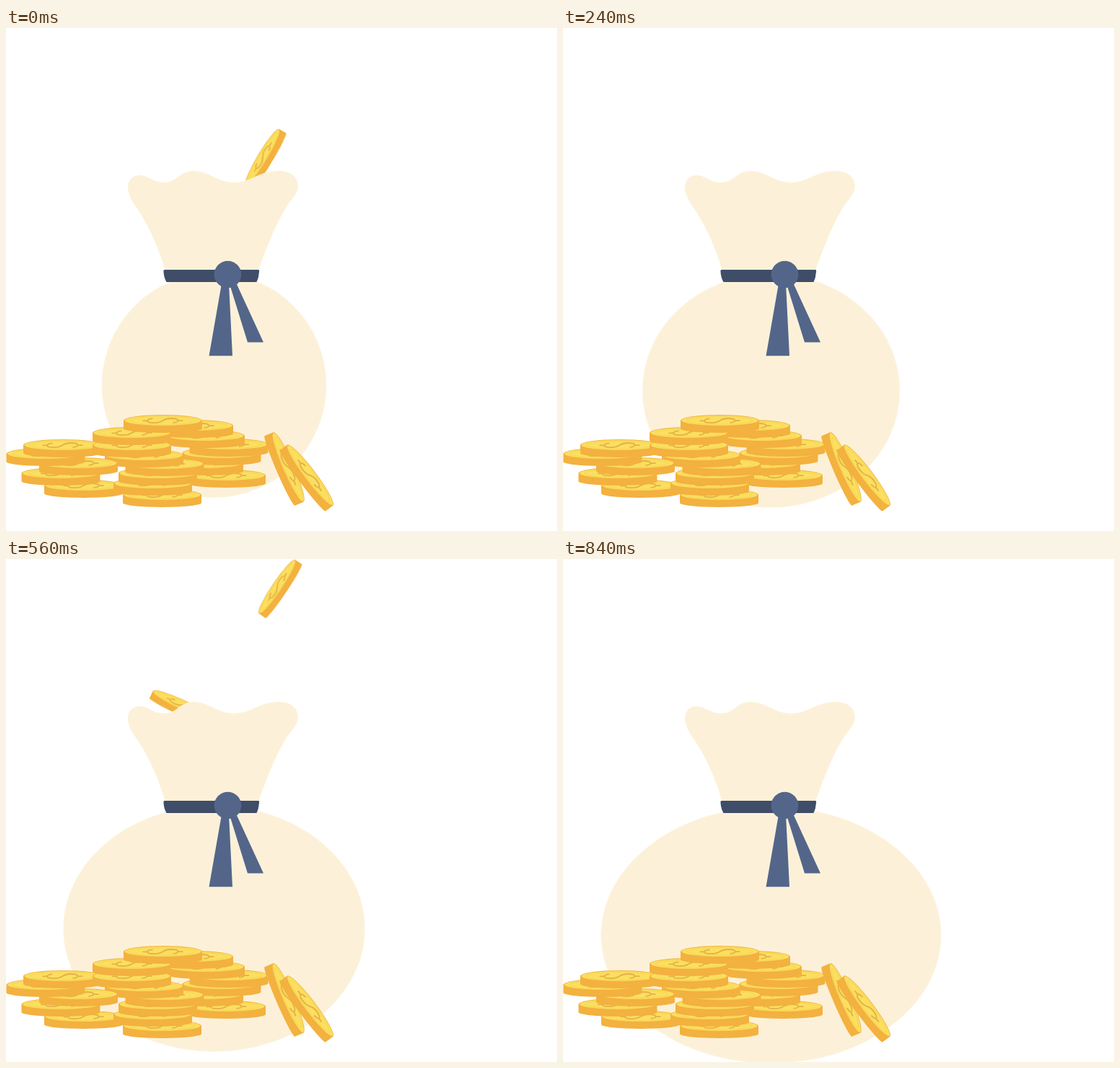
These frames come from a looping animation (764 by 697 pixels, 1000 ms). An HTML page without scripts:

```html
<!DOCTYPE html>
<html lang="en">
<head>
<meta charset="utf-8">
<title>Money bag</title>
<style>
html, body { margin: 0; width: 100%; height: 100%; overflow: hidden; background: #fff; }
svg { display: block; width: 764px; height: 697px; }
.cloth { fill: #fcf1d8; }
.band { fill: #3f4d69; }
.knot { fill: #53668a; }
.gold { fill: #f3b13f; }

.belly { animation: grow 1s -1ms infinite; }
@keyframes grow {
  0% { transform: translate(288.5px, 495px) scale(1); animation-timing-function: steps(21, end); }
  84%, 100% { transform: translate(288.5px, 521px) scale(1.514, 1.141); }
}

/* --t is the moment a coin appears; it falls for six ticks of 40 ms */
.drop { visibility: hidden; animation: drop 1s calc(var(--t) - 1001ms) infinite; }
@keyframes drop {
  0% { visibility: visible; transform: var(--from); animation-timing-function: steps(6, end); }
  24%, 100% { visibility: hidden; transform: var(--to); }
}
.right { --from: translate(380.5px, 41.5px) rotate(-56deg); --to: translate(320.5px, 461.5px) rotate(-65deg); }
.late { --from: translate(360.5px, 181.5px) rotate(-59deg); --to: translate(300.5px, 601.5px) rotate(-68deg); }
.mid { --from: translate(285px, 55px) rotate(39.6deg); --to: translate(285px, 415px) rotate(39.6deg); }
.steep { --from: translate(230.5px, 116.5px) rotate(59deg); --to: translate(275.5px, 359.5px) rotate(59deg); }
.flat { --from: translate(253px, 147px) rotate(26deg); --to: translate(253px, 507px) rotate(26deg); }
.flat.left { --from: translate(242px, 147px) rotate(25deg); --to: translate(242px, 507px) rotate(25deg); }
</style>
</head>
<body>
<svg viewBox="0 0 764 697">
  <defs>
    <g id="face">
      <ellipse cy="-.2" rx="53" ry="6.9" fill="#fbdf5e"/>
      <ellipse rx="46" ry="5.4" fill="none" stroke="#f6d255" stroke-width=".8"/>
      <path d="M-14 -2.6C-24 -2.2 -25 3.2 -12 3.2C2 3.2 -2 -3 11 -3C24 -3 24 2.4 14 2.8M-28 .4H-20M20 .2H28" fill="none" stroke="#e5b04a" stroke-width="1.8"/>
    </g>
    <g id="coin">
      <path class="gold" d="M-54.5 0a54.5 8 0 0 1 109 0v11a54.5 6 0 0 1-109 0z"/>
      <use href="#face"/>
    </g>
    <g id="fat">
      <path class="gold" d="M-45-5.5a45 7 0 0 1 90 0v11a45 3.5 0 0 1-90 0z"/>
      <use href="#face" transform="translate(0 -5.3) scale(.83 .9)"/>
    </g>
  </defs>

  <use class="drop late" href="#fat" style="--t:0ms"/>
  <use class="drop right" href="#fat" style="--t:320ms"/>
  <use class="drop right" href="#fat" style="--t:560ms"/>
  <use class="drop mid" href="#fat" style="--t:120ms"/>
  <use class="drop mid" href="#fat" style="--t:360ms"/>
  <use class="drop mid" href="#fat" style="--t:600ms"/>
  <use class="drop flat" href="#fat" style="--t:280ms"/>
  <use class="drop flat left" href="#fat" style="--t:520ms"/>
  <use class="drop steep" href="#fat" style="--t:40ms"/>
  <use class="drop steep" href="#fat" style="--t:280ms"/>

  <circle class="cloth belly" r="155.7"/>
  <path class="cloth" d="M169 222C168 211 176 204 185 204C197 204 204 214 219 214C238 214 240 198 260 198C281 198 293 214 316 214C340 214 350 198 378 198C396 198 405 208 405 219C405 229 397 236 390 246C374 271 362 303 350 336V345H221V336C211 305 201 280 185 255C176 242 170 234 169 222Z"/>
  <path class="band" d="M220 335H350Q351.5 335 351 338Q350.500 346 347.500 352H222.500Q219 346 218.500 338Q218 335 220 335Z"/>
  <g class="knot">
    <path d="M299 354H309L314 454.3H281.5ZM311 358L319 353L357 435.5H335Z"/>
    <circle cx="307.5" cy="341.5" r="18.8"/>
  </g>

  <use href="#coin" x="305.5" y="620"/>
  <use href="#coin" x="274.5" y="603"/>
  <use href="#coin" x="299" y="589"/>
  <use href="#coin" x="309" y="577"/>
  <use href="#coin" x="276.5" y="565"/>
  <use href="#coin" x="260.5" y="551"/>
  <use href="#coin" x="216.5" y="647"/>
  <use href="#coin" x="107.5" y="634"/>
  <use href="#coin" x="203.5" y="631"/>
  <use href="#coin" x="210.5" y="617"/>
  <use href="#coin" x="220" y="604"/>
  <use href="#coin" x="76" y="617"/>
  <use href="#coin" x="191.5" y="592"/>
  <use href="#coin" x="100.5" y="603"/>
  <use href="#coin" x="55" y="590"/>
  <use href="#coin" x="78.5" y="578"/>
  <use href="#coin" x="174.5" y="578"/>
  <use href="#coin" x="174.5" y="561"/>
  <use href="#coin" x="217.5" y="544"/>

  <use href="#fat" transform="translate(385.5 611) rotate(66.5) scale(1.17)"/>
  <use href="#fat" transform="translate(416.5 623.5) rotate(53) scale(1.17)"/>
</svg>
</body>
</html>
```
